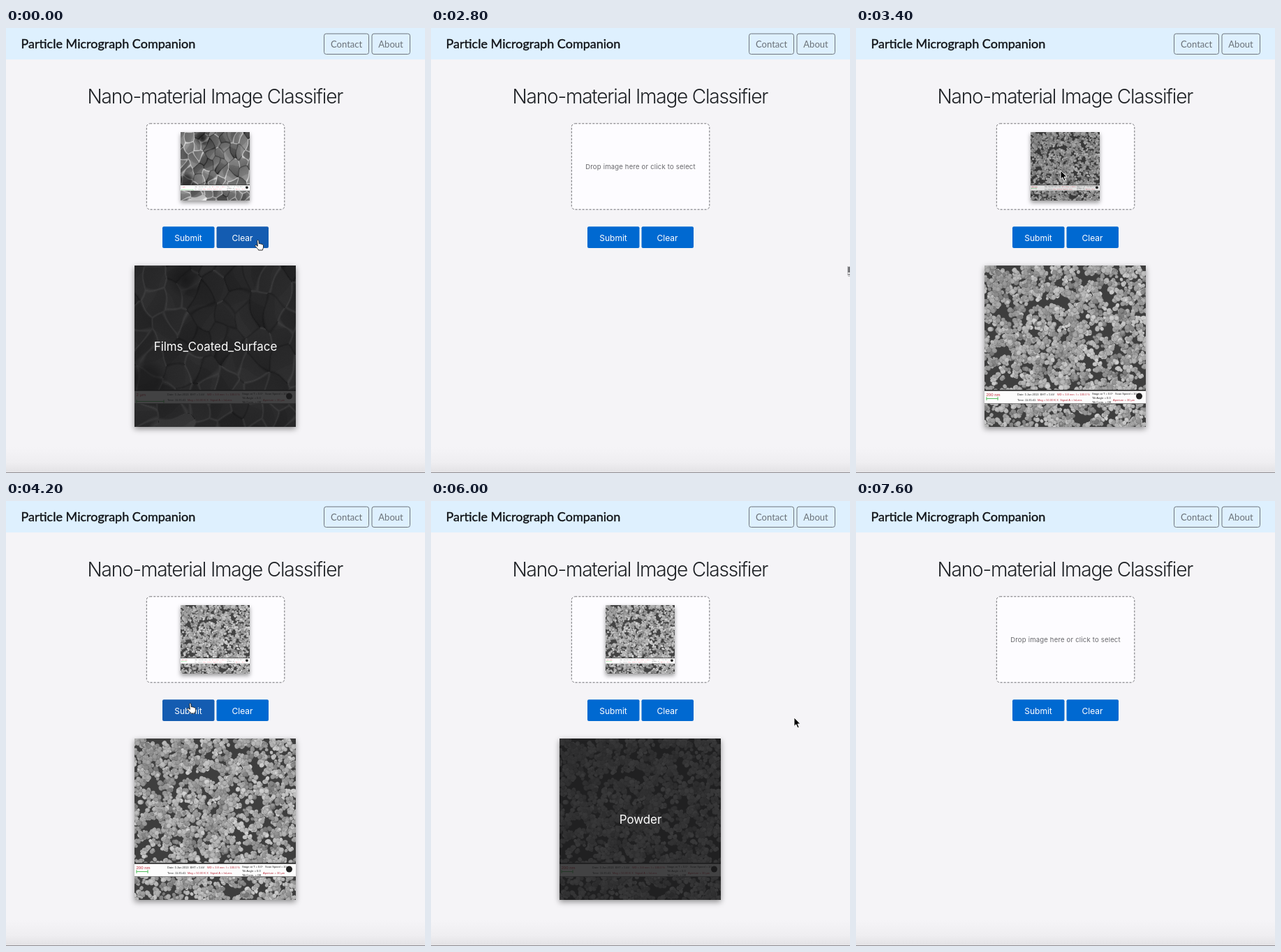
Recreate the animation shown at these times as an HTML page with a canvas. Size 600x637 px, loop 8 s.

```html
<!DOCTYPE html>
<html lang="en">
<head>
<meta charset="utf-8">
<title>Nano-material Image Classifier</title>
<style>
  html, body { margin: 0; width: 100%; height: 100%; overflow: hidden; background: #f5f4f7; }
  #stage { position: relative; width: 600px; height: 637px; overflow: hidden; }
  svg, canvas { position: absolute; display: block; }
  svg { left: 0; top: 0; }
  text { font-family: Inter, "Open Sans", sans-serif; font-optical-sizing: none; }
  .nav text { font: 13px Lato, sans-serif; fill: #6a7178; text-anchor: middle; }
  .nav rect { fill: none; stroke: #6f767d; }
  .brand { font: 18px Lato, sans-serif; fill: #111418; stroke: #111418; stroke-width: .4px; }
  .head { font-size: 28px; font-weight: 300; letter-spacing: -1.2px; fill: #1f2226; text-anchor: middle; }
  .hint { font-size: 9.5px; letter-spacing: .2px; fill: #66666a; text-anchor: middle; }
  .btn text { font-size: 12px; fill: #fff; text-anchor: middle; }
  #label { font-size: 16.9px; fill: #fff; text-anchor: middle; }
  #thumb { left: 250px; top: 149px; width: 99px; height: 98px; box-shadow: 0 3px 6px rgba(0,0,0,.4); }
  #result { left: 184px; top: 340px; width: 231px; height: 231px; box-shadow: 0 3px 8px rgba(0,0,0,.42); }
</style>
</head>
<body>
<div id="stage">
  <svg width="600" height="637">
    <defs>
      <linearGradient id="foot" x2="0" y2="1">
        <stop offset="0" stop-color="#f5f4f7"/>
        <stop offset=".6" stop-color="#efeef1"/>
        <stop offset="1" stop-color="#e3e2e5"/>
      </linearGradient>
    </defs>
    <rect width="600" height="637" fill="#f5f4f7"/>
    <rect y="600" width="600" height="36" fill="url(#foot)"/>
    <rect y="636" width="600" height="1" fill="#918f94"/>
    <rect width="600" height="45" fill="#def0fe"/>
    <text class="brand" x="21.5" y="29.3">Particle Micrograph Companion</text>
    <g class="nav">
      <rect x="455.5" y="8.2" width="64" height="29.3" rx="3"/>
      <text x="487.6" y="27.6">Contact</text>
      <rect x="524" y="8.2" width="54.5" height="29.3" rx="3"/>
      <text x="551" y="27.6">About</text>
    </g>
    <text class="head" x="299.3" y="108">Nano-material Image Classifier</text>
    <rect x="201.3" y="136.8" width="197.5" height="123" rx="5" fill="#fdfcff" stroke="#707074" stroke-dasharray="3 2"/>
    <text class="hint" id="hint" x="300" y="202">Drop image here or click to select</text>
    <g class="btn">
      <rect id="submit" x="224" y="284.3" width="74.5" height="30.7" rx="2"/>
      <text x="261" y="304.8">Submit</text>
      <rect id="clear" x="301.5" y="284.3" width="74.5" height="30.7" rx="2"/>
      <text x="338.6" y="304.8">Clear</text>
    </g>
  </svg>
  <canvas id="thumb" width="198" height="196"></canvas>
  <canvas id="result" width="231" height="231"></canvas>
  <svg width="600" height="637">
    <text id="label" x="300" y="461.6"></text>
    <g id="dots" fill="#fff"></g>
    <g id="drag">
      <rect x="1" y="2" width="17" height="13" rx="1" fill="#000" opacity=".18"/>
      <rect x=".5" y=".5" width="16" height="12" fill="#77777b" stroke="#c9c9cc"/>
      <rect x="1" y="9" width="15" height="2" fill="#eee"/>
    </g>
    <path id="arrow" d="M0 0V12.4L2.8 9.8 5 14.8 7.1 13.9 5 9.1H8.8Z" fill="#000" stroke="#fff" stroke-width=".9"/>
    <path id="hand" d="M3.6 1.6C3.8.2 5.6.2 5.9 1.6L6.4 6C7 5.2 8.3 5.3 8.6 6.3 9.2 5.7 10.4 5.9 10.6 7 11.3 6.5 12.5 7 12.5 8.2V10.5C12.5 12.5 11.6 13.2 11.3 15H5.6C5.2 13.2 2.8 11.6.8 9.2 0 8 1.6 7.2 2.6 8L4.3 9.3Z" fill="#fff" stroke="#111" stroke-width=".9"/>
  </svg>
</div>
<script>
const LOOP = 8000, SIZE = 231;
const BLUE = '#0069d1', PRESSED = '#145cb1';
const $ = id => document.getElementById(id);

function random(seed) {
  return () => {
    seed = (seed + 0x6D2B79F5) | 0;
    let v = Math.imul(seed ^ seed >>> 15, 1 | seed);
    v ^= v + Math.imul(v ^ v >>> 7, 61 | v);
    return ((v ^ v >>> 14) >>> 0) / 4294967296;
  };
}

function newCanvas() {
  const c = document.createElement('canvas');
  c.width = c.height = SIZE;
  return c;
}

const gray = v => `rgb(${v},${v},${v})`;

// Faceted grains: a warped cell diagram with some light ridges and some cracks.
function drawFilms() {
  const c = newCanvas(), g = c.getContext('2d');
  const rnd = random(17), cells = [], step = 31;
  for (let row = -1; row < 9; row++)
    for (let col = -1; col < 9; col++)
      cells.push({
        x: (col + rnd() * 1.1) * step, y: (row + rnd() * 1.1) * step,
        tone: 70 + rnd() * 42, dir: rnd() * 6.28, ridge: rnd()
      });
  const img = g.createImageData(SIZE, SIZE);
  for (let y = 0; y < SIZE; y++) for (let x = 0; x < SIZE; x++) {
    const wx = x + 2.5 * Math.sin(y / 9), wy = y + 2.5 * Math.sin(x / 8 + y / 20);
    let d1 = 1e9, d2 = 1e9, a, b;
    for (const s of cells) {
      const d = Math.hypot((wx - s.x) * 1.15, (wy - s.y) * .86);
      if (d < d1) { d2 = d1; b = a; d1 = d; a = s; }
      else if (d < d2) { d2 = d; b = s; }
    }
    const slope = (wx - a.x) * Math.cos(a.dir) + (wy - a.y) * Math.sin(a.dir);
    const edge = Math.max(0, 1 - (d2 - d1) / 4);
    const ridge = a.ridge + b.ridge > .9 ? 85 : -45;
    let v = a.tone + slope * .6 + (slope > 6 ? 14 : 0) + edge * ridge + rnd() * 10;
    v *= 1 - .7 * Math.max(0, 1 - Math.hypot(x - 72, y - 20) / 26);
    v *= 1 - .55 * Math.min(1, 2 * Math.max(0, 1 - Math.hypot(x - 18, y - 163) / 30));
    const i = (y * SIZE + x) * 4;
    img.data[i] = img.data[i + 1] = img.data[i + 2] = v;
    img.data[i + 3] = 255;
  }
  g.putImageData(img, 0, 0);
  drawStrip(g, '2 µm', 40, 194);
  return c;
}

// Lumps of a few beads each, piled over dark gaps.
function drawPowder() {
  const c = newCanvas(), g = c.getContext('2d'), rnd = random(5);
  g.fillStyle = gray(62);
  g.fillRect(0, 0, SIZE, SIZE);
  const bead = (x, y, r, v, turn) => {
    const shade = g.createRadialGradient(x - r * .2, y - r * .3, r * .2, x, y, r * 1.15);
    shade.addColorStop(0, gray(v | 0));
    shade.addColorStop(.65, gray(v * .94 | 0));
    shade.addColorStop(1, gray(v * .45 | 0));
    g.fillStyle = shade;
    g.beginPath();
    g.ellipse(x, y, r, r * .82, turn, 0, 7);
    g.fill();
  };
  for (let i = 0; i < 900; i++) {
    const x = rnd() * SIZE, y = rnd() * SIZE;
    const tone = 118 + rnd() * 62;
    for (let k = 0; k < 4; k++)
      bead(x + (rnd() - .5) * 9, y + (rnd() - .5) * 9, 2.4 + rnd() * 1.8,
           tone + rnd() * 40, rnd() * 3);
  }
  drawStrip(g, '200 nm', 17, 190);
  return c;
}

function drawStrip(g, scale, length, lineY) {
  const write = (text, x, y, color, size = 4) => {
    g.font = `${size}px "Liberation Sans", sans-serif`;
    g.fillStyle = color;
    g.fillText(text, x, y);
  };
  g.fillStyle = '#181818';
  g.fillRect(0, 178, SIZE, 20);
  g.fillStyle = '#fcfcfc';
  g.fillRect(0, 179.5, SIZE, 18);
  write(scale, 2.5, 187, '#c22a3a', 6);
  g.fillStyle = '#55bd60';
  g.fillRect(2.5, lineY, length, 1);
  g.fillRect(2.5, lineY - 2, 1, 5);
  g.fillRect(1.5 + length, lineY - 2, 1, 5);
  write('Date: 5 Jun 2013  EHT = 5 kV', 47, 186, '#222');
  write('WD = 3.8 mm  I = 100.0 %', 104, 186, '#b82838');
  write('Time: 11:35:41', 47, 194, '#222');
  write('Mag = 50.00 K X  Signal A = InLens', 76, 194, '#b82838');
  write('Stage at T = 0.0°', 154, 185, '#222');
  write('Tilt Angle = 0.0', 154, 191, '#222');
  write('Tilt Corrn. = Off', 154, 197, '#222');
  write('Scan Speed = 10', 187, 185, '#222');
  write('Aperture = 30 µm', 184, 194, '#b82838');
  g.fillStyle = '#222';
  g.beginPath();
  g.arc(221.5, 187, 4.5, 0, 7);
  g.fill();
}

const images = { films: drawFilms(), powder: drawPowder() };

// start, picture, shade, caption, caption opacity
const scenes = [
  [0, 'films', .82, 'Films_Coated_Surface', 1],
  [400, null, 0, '', 0],
  [3400, 'powder', 0, '', 0],
  [4400, 'powder', .82, '', 0],
  [5000, 'powder', .82, 'Powder', .55],
  [5200, 'powder', .82, 'Powder', 1],
  [7400, null, 0, '', 0]
];

// start, pointer, x, y
const pointer = [
  [0, 'hand', 356, 303], [600, ''],
  [2800, 'drag', 596, 341], [3000, 'drag', 530, 246], [3200, 'drag', 296, 207],
  [3400, 'arrow', 293, 204], [3800, 'arrow', 276, 265],
  [4000, 'hand', 259, 289], [4800, 'arrow', 298, 322], [5000, 'arrow', 520, 310],
  [6400, 'arrow', 483, 309], [6600, 'arrow', 433, 311], [6800, 'arrow', 383, 312],
  [7000, 'hand', 363, 306], [7200, 'hand', 326, 299],
  [7400, 'arrow', 395, 306], [7600, '']
];

const current = (steps, t) => steps.findLast(s => s[0] <= t);
const between = (t, a, b) => t >= a && t < b;

function paint(id, source, shade) {
  const c = $(id), g = c.getContext('2d');
  c.style.display = source ? 'block' : 'none';
  if (!source) return;
  g.drawImage(images[source], 0, 0, c.width, c.height);
  g.fillStyle = `rgba(26,26,28,${shade})`;
  g.fillRect(0, 0, c.width, c.height);
}

function loader(t) {
  const n = between(t, 4400, 5000) ? 1 + 2 * Math.floor((t - 4400) / 200) : 0;
  let out = '';
  for (let i = 0; i < n; i++) {
    const a = .32 + i * .8;
    out += `<circle cx="${300 + 9.5 * Math.cos(a)}" cy="${457 + 9.5 * Math.sin(a)}" r="1.2"/>`;
  }
  $('dots').innerHTML = out;
}

let last = -1;
function render(t) {
  const tick = Math.floor(t / 200);
  if (tick === last) return;
  last = tick;

  const [, picture, shade, caption, alpha] = current(scenes, t);
  paint('thumb', picture, 0);
  paint('result', picture, shade);
  $('thumb').style.filter = between(t, 3400, 3800) ? 'brightness(.9)' : 'brightness(1.08)';
  $('hint').style.display = picture ? 'none' : '';
  $('label').textContent = caption;
  $('label').style.opacity = alpha;
  loader(t);

  $('submit').style.fill = between(t, 4000, 4800) ? PRESSED : BLUE;
  $('clear').style.fill = t < 600 || between(t, 7000, 7600) ? PRESSED : BLUE;

  const [, kind, x, y] = current(pointer, t);
  for (const id of ['arrow', 'hand', 'drag']) {
    $(id).style.display = id === kind ? '' : 'none';
    if (id === kind) $(id).setAttribute('transform', `translate(${x} ${y})`);
  }
}

const start = performance.now();
function frame() {
  render((performance.now() - start) % LOOP);
  requestAnimationFrame(frame);
}
frame();
</script>
</body>
</html>
```
